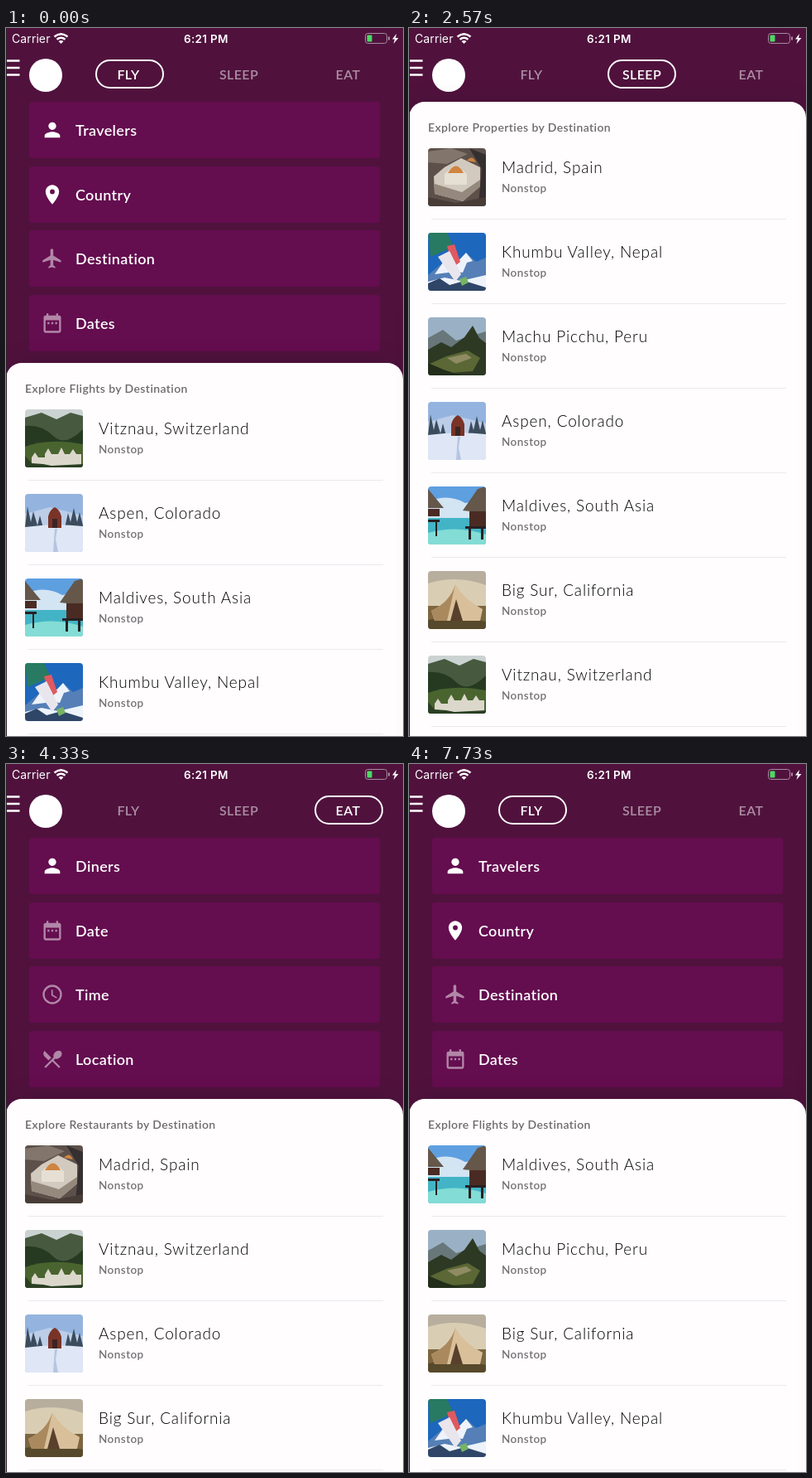
An HTML page for the animation above (8210 ms loop, 480 px wide and 854 px high).

```html
<!DOCTYPE html>
<html lang="en">
<head>
<meta charset="utf-8">
<title>Travel planner</title>
<style>
  html, body { margin: 0; width: 100%; height: 100%; overflow: hidden; background: #50123d; }
  #stage { position: relative; width: 480px; height: 854px; overflow: hidden; background: #50123d; color: #fff; font-family: Lato, sans-serif; }
  #stage div, #stage svg { position: absolute; }
  .text { white-space: nowrap; transform: translateY(calc(-50% - .5px)); }
  .status { font: 400 14px Inter, sans-serif; letter-spacing: .1px; }
  .clock { font-weight: 600; font-size: 13.5px; letter-spacing: .3px; }
  .tab { font-size: 16px; font-weight: 600; letter-spacing: .4px; transform: translate(-50%, calc(-50% - .5px)); }
  .pill { top: 38px; width: 79px; height: 31px; border: 2px solid #fff; border-radius: 18px; }
  .ripple { border-radius: 50%; background: #fff; transform: translate(-50%, -50%); }
  .box, .field { left: 28px; width: 424px; height: 68px; border-radius: 4px; }
  .box { background: #640d4f; }
  .field .text { left: 56px; top: 34px; font-size: 18px; font-weight: 600; letter-spacing: .35px; }
  .field svg { left: 14px; top: 20px; fill: #fff; }
  .sheet { width: 480px; height: 900px; border-radius: 19px 19px 0 0; background: #fffdfe; box-shadow: 0 8px 34px rgba(0, 0, 0, .22); }
  .heading { left: 23px; top: 31px; font-size: 14px; font-weight: 600; letter-spacing: .4px; color: #6c6a6c; }
  .thumb { left: 23px; border-radius: 4px; }
  .place { left: 112px; font-size: 19px; font-weight: 300; letter-spacing: .85px; color: #000; }
  .note { left: 112px; font-size: 13.5px; font-weight: 600; letter-spacing: .45px; color: #747274; }
  .rule { left: 27px; width: 429px; height: 1px; background: #ebe9eb; }
  .edge { left: 0; top: 0; width: 1px; height: 854px; background: #2b2029; }
</style>
</head>
<body>
<div id="stage"></div>
<script>
const LOOP = 8210, SLIDE = 300, TOP = 89;
const CLOSE_AT = 330, OPEN_AT = 2700;
const moves = [
  { at: 1697, from: 0, to: 1 },
  { at: 3450, from: 1, to: 2 },
  { at: 5268, from: 2, to: 0 },
];

const icons = {
  person: 'M12 12c2.21 0 4-1.79 4-4s-1.79-4-4-4-4 1.79-4 4 1.79 4 4 4zm0 2c-2.67 0-8 1.34-8 4v2h16v-2c0-2.66-5.33-4-8-4z',
  pin: 'M12 2C8.13 2 5 5.13 5 9c0 5.25 7 13 7 13s7-7.75 7-13c0-3.87-3.13-7-7-7zm0 9.5a2.5 2.5 0 1 1 0-5 2.5 2.5 0 0 1 0 5z',
  plane: 'M21 16v-2l-8-5V3.5c0-.83-.67-1.5-1.5-1.5S10 2.67 10 3.5V9l-8 5v2l8-2.5V19l-2 1.5V22l3.5-1 3.5 1v-1.5L13 19v-5.5z',
  calendar: 'M9 11H7v2h2zm4 0h-2v2h2zm4 0h-2v2h2zm2-7h-1V2h-2v2H8V2H6v2H5a2 2 0 0 0-2 2v14a2 2 0 0 0 2 2h14a2 2 0 0 0 2-2V6a2 2 0 0 0-2-2zm0 16H5V9h14z',
  clock: 'M12 2a10 10 0 1 0 0 20 10 10 0 0 0 0-20zm0 18a8 8 0 1 1 0-16 8 8 0 0 1 0 16zm.5-13H11v6l5.25 3.15.75-1.23-4.5-2.67z',
  bed: 'M7 13a3 3 0 1 0 0-6 3 3 0 0 0 0 6zm12-6h-8v7H3V5H1v15h2v-3h18v3h2v-9a4 4 0 0 0-4-4z',
  cutlery: 'M8.1 13.34l2.83-2.83L3.91 3.5a4 4 0 0 0 0 5.66zm6.78-1.81c1.53.71 3.68.21 5.27-1.38 1.91-1.91 2.28-4.65.81-6.12-1.46-1.46-4.2-1.1-6.12.81-1.59 1.59-2.09 3.74-1.38 5.27L3.7 19.87l1.41 1.41L12 14.41l6.88 6.88 1.41-1.41L13.41 13z',
};

// Each picture is a sky colour followed by flat [colour, path] shapes.
const places = {
  v: ['Vitznau, Switzerland', '#cbd3d2', [
    ['#475a3f', 'M0 10L20 4 38 12 55 4 70 8V70H0z'], ['#263a22', 'M0 20Q20 18 34 32T70 24V70H0z'],
    ['#4a642f', 'M0 45Q30 34 70 42V70H0z'], ['#dbd8cb', 'M8 58l4-6 4 6h8v-4l4-7 4 7h8l4-8 4 8h6l4-6 4 6h6V68H8z'],
    ['#2b3f24', 'M0 70V56l8 9 14 1 10 2 38-2V70z']]],
  a: ['Aspen, Colorado', '#94b4df', [
    ['#bccde8', 'M0 24L30 16 70 26V44H0z'],
    ['#3c4c5d', 'M0 40l3-25 4 19 3-13 5 17 3-12 4 15H48l4-18 3 11 4-17 4 17 3-12 4 16v5H0z'],
    ['#dfe6f5', 'M0 40Q35 35 70 39V70H0z'], ['#793427', 'M28 41V27Q30 19 36 16q6 3 8 11v14z'],
    ['#3c2424', 'M33 41V30h6v11z'], ['#b5c5e2', 'M36 42h3l-2 13 3 15h-6l1-15z']]],
  m: ['Maldives, South Asia', '#5e9fe0', [
    ['#d3e4f3', 'M0 18Q25 8 45 20L70 16V39H0z'], ['#42b4c6', 'M0 38H70V70H0z'], ['#83dcd5', 'M0 56Q35 46 70 58V70H0z'],
    ['#65574a', 'M0 3L19 26H0zM42 29L60 3l10-3v32z'], ['#4a2b23', 'M0 27H14v9H0zM50 30H70V50H50z'],
    ['#282023', 'M0 40H14v3H11V60H9V43H0zM45 48H70v3H67V64h-3V51H52V64h-3V51h-4z']]],
  k: ['Khumbu Valley, Nepal', '#1d67bd', [
    ['#557fb6', 'M0 51L18 36 31 43 46 24 58 35 70 30V70H0z'], ['#eef3fb', 'M8 50l10-14 8 9 20-21 8 10-7 2-5 12-9-1zM0 59l20-5 20 4 30-7V70H0z'],
    ['#2f4668', 'M0 61l14-6 12 8 18-5 26 8v4H0z'], ['#287a62', 'M0 0H23L31 17 3 29z'],
    ['#df5960', 'M23 16l9-2 7 21-9 7z'], ['#e9e5ec', 'M12 29l14-7 14 28-7 9z'], ['#76b465', 'M38 56l8-3 3 7-8 4z']]],
  b: ['Big Sur, California', '#b7ae9d', [
    ['#d9ceb4', 'M0 15Q35 4 70 17V43H0z'], ['#7d6640', 'M0 42H70V70H0z'], ['#57492b', 'M0 59Q35 52 70 61V70H0z'],
    ['#d9c09a', 'M33 16Q44 35 66 46L63 60H8L4 48Q27 37 33 16z'], ['#aa895e', 'M33 16L23 60H8L4 48Q27 37 33 16z'],
    ['#59402d', 'M34 34L27 60H42z']]],
  p: ['Machu Picchu, Peru', '#9ab1c5', [
    ['#68777a', 'M0 25L18 15 34 28 70 17V70H0z'], ['#2d3923', 'M0 39L16 30 28 36 44 24 54 10 62 25 70 31V70H0z'],
    ['#5b6734', 'M0 57L22 47 48 40 63 49 54 65 29 67z'], ['#8f8b63', 'M23 49l23-5 7 5-19 7z'], ['#222d1a', 'M0 55l21 9 20 6H0z']]],
  s: ['Madrid, Spain', '#5d504a', [
    ['#82766c', 'M0 4L28 0 48 7 23 19 0 17z'], ['#362f30', 'M50 0L70 8V70L61 67 65 25z'],
    ['#d2cabe', 'M7 34L20 23 40 12 63 23V46L42 64 8 55z'], ['#95897d', 'M8 43l33 10 22-15v8L42 64 8 55z'],
    ['#e6dfd3', 'M20 31q13-13 27 0v13H20z'], ['#cf843f', 'M24 30Q34 13 43 30zM47 15q7-8 11 2z'],
    ['#483c37', 'M0 59l33 7 37-7V70H0z']]],
};

// Orders hold the list shown before closing, while closed, and after reopening.
const tabs = [
  { name: 'FLY', x: 148, noun: 'Flights', open: 404, orders: ['vamkbps', 'bpksamv', 'mpbksav'],
    fields: [['Travelers', 'person', 1], ['Country', 'pin', 1], ['Destination', 'plane', .5], ['Dates', 'calendar', .5]] },
  { name: 'SLEEP', x: 281.5, noun: 'Properties', open: 328, orders: ['skpambv', 'skpambv', 'svapkmb'],
    fields: [['Travelers', 'person', 1], ['Dates', 'calendar', .5], ['Location', 'bed', .5]] },
  { name: 'EAT', x: 413.5, noun: 'Restaurants', open: 404, orders: ['svabmkp', 'svabmkp', 'svabmkp'],
    fields: [['Diners', 'person', 1], ['Date', 'calendar', .5], ['Time', 'clock', .5], ['Location', 'cutlery', .5]] },
];

const stage = document.getElementById('stage');

function add(parent, className, style = '', html = '') {
  const el = document.createElement('div');
  el.className = className;
  el.style.cssText = style;
  el.innerHTML = html;
  return parent.appendChild(el);
}

const fieldTop = i => `top:${TOP + Math.round(i * 77.7)}px`;

function buildFields(tab) {
  const layer = add(stage, 'layer');
  tab.fields.forEach(([label, icon, alpha], i) => add(layer, 'field', fieldTop(i),
    `<svg width="28" height="28" viewBox="0 0 24 24" opacity="${alpha}"><path fill-rule="evenodd" d="${icons[icon]}"/></svg>
     <div class="text">${label}</div>`));
  return layer;
}

function buildRow(key, i) {
  const [name, sky, shapes] = places[key], y = 56 + i * 102;
  const paths = shapes.map(([fill, d]) => `<path fill="${fill}" d="${d}"/>`).join('');
  return `<svg class="thumb" style="top:${y}px;background:${sky}" width="70" height="70">${paths}</svg>
    <div class="text place" style="top:${y + 23}px">${name}</div>
    <div class="text note" style="top:${y + 47.5}px">Nonstop</div>
    <div class="rule" style="top:${y + 85}px"></div>`;
}

function buildSheet(tab) {
  const sheet = add(stage, 'sheet');
  add(sheet, 'text heading', '', `Explore ${tab.noun} by Destination`);
  tab.lists = tab.orders.map(order => add(sheet, 'list', '', [...order].map(buildRow).join('')));
  return sheet;
}

add(stage, 'text status', 'left:7px;top:13px', 'Carrier');
add(stage, 'text status clock', 'left:215px;top:13px', '6:21 PM');
add(stage, 'bar', 'left:0;top:0', `<svg width="480" height="90" fill="none" stroke="#fff">
  <path stroke-width="2.4" d="M58.5 10.5q8-6.5 16 0M61.5 13.7q5-4 10 0"/><path fill="#fff" stroke="none" d="M63.5 16q3-2 6 0l-3 3z"/>
  <rect x="434.5" y="6.5" width="26" height="12" rx="3" stroke="#a88a9f"/><path stroke="#a88a9f" stroke-width="2" d="M463 10.5v4"/>
  <rect x="436.5" y="8.5" width="6" height="8" rx="1" fill="#4cd964" stroke="none"/>
  <path fill="#fff" stroke="none" d="M472 7l-5 6.5h3l-1.5 5.5 6-7h-3.5z"/>
  <path stroke-width="2.6" d="M0 39.5H16.5M0 48H16.5M0 56.5H16.5"/>
  <circle cx="48" cy="57" r="20" fill="#fff" stroke="none"/></svg>`);

const ripple = add(stage, 'ripple');
const pill = add(stage, 'pill');
const boxes = [0, 1, 2, 3].map(i => add(stage, 'box', fieldTop(i)));
for (const tab of tabs) {
  tab.label = add(stage, 'text tab', `left:${tab.x}px;top:55.5px`, tab.name);
  tab.layer = buildFields(tab);
}
for (const tab of tabs) tab.sheet = buildSheet(tab);
add(stage, 'edge');

const clamp = x => Math.min(1, Math.max(0, x));
const mix = (a, b, k) => a + (b - a) * k;

// Cubic bezier (.25, .1, .25, 1)
function ease(x) {
  x = clamp(x);
  if (x === 0 || x === 1) return x;
  let lo = 0, hi = 1, s;
  const curve = (a, b) => 3 * s * (1 - s) ** 2 * a + 3 * s * s * (1 - s) * b + s ** 3;
  for (let i = 0; i < 20; i++) {
    s = (lo + hi) / 2;
    if (curve(.25, .25) < x) lo = s; else hi = s;
  }
  return curve(.1, 1);
}

function render(t) {
  const move = moves.filter(m => t >= m.at).pop() || { at: -LOOP, from: 0, to: 0 };
  const { from, to } = move, age = t - move.at;
  const linear = clamp(age / SLIDE), eased = ease(linear);
  const position = mix(from, to, eased);
  const phase = t < CLOSE_AT ? 0 : t < OPEN_AT ? 1 : 2;
  const openness = phase < 2 ? 1 - ease((t - CLOSE_AT) / SLIDE) : ease((t - OPEN_AT) / SLIDE);

  // The outline runs ahead of the sheets.
  pill.style.left = 108 + 132.4 * mix(to, from, (1 - eased) ** 2.8) + 'px';

  const size = age * .2;
  ripple.style.cssText = `left:${tabs[to].x - 7}px;top:58px;width:${size}px;height:${size}px;` +
    `opacity:${.28 * clamp(1 - age / 220)};display:${age < 220 ? 'block' : 'none'}`;

  boxes.forEach((box, i) => {
    const shown = tab => tabs[tab].fields.length > i ? 1 : 0;
    box.style.opacity = mix(shown(from), shown(to), linear);
  });

  tabs.forEach((tab, i) => {
    const share = k => i === to ? (from === to ? 1 : k) : i === from ? 1 - k : 0;
    tab.label.style.opacity = mix(.52, 1, share(eased));
    tab.layer.style.opacity = share(linear);
    tab.sheet.style.left = 504 * (i - position) + 'px';
    tab.sheet.style.top = mix(TOP, tab.open, openness) + 'px';
    tab.lists.forEach((list, k) => list.style.display = k === phase ? 'block' : 'none');
  });
}

function tick() {
  render(performance.now() % LOOP);
  requestAnimationFrame(tick);
}
tick();
</script>
</body>
</html>
```
